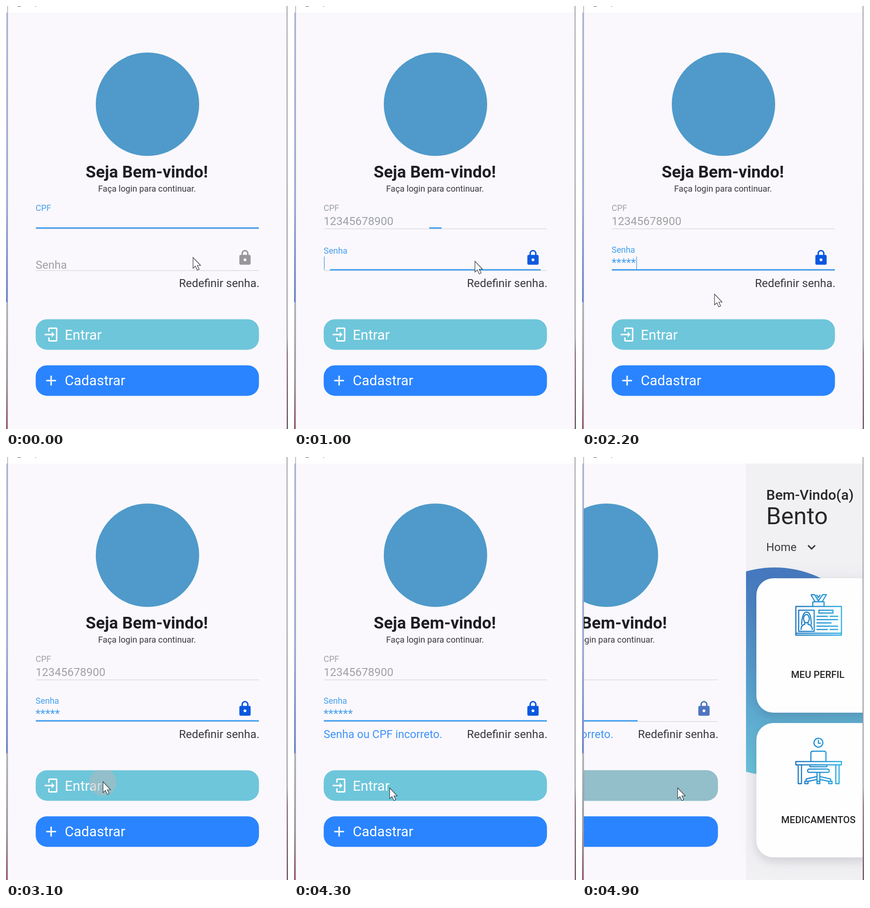
An HTML page for the animation above (5000 ms loop, 600 by 900 pixels).

```html
<!DOCTYPE html>
<html lang="pt-BR">
<head>
<meta charset="utf-8">
<title>Login</title>
<style>
  html, body { margin: 0; width: 100%; height: 100%; overflow: hidden; background: #faf8fc; }
  svg { display: block; width: 600px; height: 900px; font-family: Roboto, sans-serif; }
  .mid { text-anchor: middle; }
  .body { font-size: 24px; }
  .label { font-size: 18px; }
  .button { font-size: 29.6px; fill: #fff; }
  .dark { fill: #39393d; }
  .rule { fill: #d8d7da; }
  .white { fill: none; stroke: #fff; stroke-width: 3; }
  .card {
    fill: #fefefe;
    filter: drop-shadow(0 8px 10px rgba(40, 40, 60, .13)) drop-shadow(0 4px 24px rgba(40, 40, 60, .05));
  }
  .caption { font-size: 20.5px; font-weight: 500; fill: #28282b; text-anchor: middle; }
  .icon { fill: none; stroke: url(#ink); stroke-width: 2.4; stroke-linejoin: round; }
  .ripple { fill: #b6bab8; }
</style>
</head>
<body>
<svg viewBox="0 0 600 900">
  <defs>
    <linearGradient id="ink" gradientUnits="userSpaceOnUse" x1="454" y1="0" x2="553" y2="0">
      <stop offset="0" stop-color="#1d74c0"/><stop offset="1" stop-color="#2bb0e4"/>
    </linearGradient>
    <linearGradient id="sea" gradientUnits="userSpaceOnUse" x1="370" y1="250" x2="420" y2="690">
      <stop offset="0" stop-color="#4679bf"/><stop offset="1" stop-color="#6bc5da"/>
    </linearGradient>
    <linearGradient id="left" x1="0" y1="0" x2="0" y2="1">
      <stop offset="0" stop-color="#c3cdec"/><stop offset=".45" stop-color="#a9b9e8"/>
      <stop offset=".694" stop-color="#6f8be0"/><stop offset=".697" stop-color="#c4c6cc"/>
      <stop offset=".88" stop-color="#a9a6ac"/><stop offset="1" stop-color="#a4606c"/>
    </linearGradient>
    <linearGradient id="right" x1="0" y1="0" x2="0" y2="1">
      <stop offset="0" stop-color="#dcdce2"/><stop offset=".78" stop-color="#c9c8ce"/>
      <stop offset=".82" stop-color="#a08087"/><stop offset="1" stop-color="#6b4a52"/>
    </linearGradient>
    <clipPath id="pane"><rect x="4" y="14" width="593" height="886"/></clipPath>
    <clipPath id="page"><rect x="349" y="14" width="594" height="886"/></clipPath>
    <clipPath id="enter"><rect x="63.2" y="666.4" width="475" height="65" rx="24"/></clipPath>
  </defs>

  <rect width="600" height="900" fill="#faf8fc"/>
  <rect width="600" height="14" fill="#fff"/>
  <circle cx="28" cy="-7" r="8.5" fill="#77777b"/>
  <text x="61" y="-3" font-size="18" fill="#77777b">y</text>

  <g clip-path="url(#pane)">
    <g id="login">
      <circle cx="301" cy="209" r="110" fill="#4f9aca"/>
      <text class="mid" x="299.6" y="365" font-size="35.3" font-weight="700" fill="#1e1e22">Seja Bem-vindo!</text>
      <text class="mid" x="300" y="395" font-size="18.2" fill="#39393d">Faça login para continuar.</text>

      <rect class="rule" x="63.5" y="473.5" width="474.5" height="1.3"/>
      <rect id="cpfLine" y="470.8" height="3" fill="#439ff0"/>
      <text id="cpfLabel" class="label" x="63" y="436">CPF</text>
      <text id="cpfText" class="body" x="63" y="466"></text>
      <rect id="cpfCaret" y="444" width="1.3" height="26" fill="#439ff0"/>

      <rect class="rule" x="63.5" y="562.2" width="474.5" height="1.3"/>
      <rect id="passLine" y="559.8" height="3" fill="#439ff0"/>
      <text id="passLabel" x="63">Senha</text>
      <text id="passText" class="body" x="63" y="554"></text>
      <rect id="passCaret" y="533" width="1.3" height="28" fill="#439ff0"/>
      <path id="lock" transform="translate(490.5 517.5) scale(1.5)" d="M12 17a2 2 0 0 0 0-4 2 2 0 0 0 0 4m6-9a2 2 0 0 1 2 2v10a2 2 0 0 1-2 2H6a2 2 0 0 1-2-2V10a2 2 0 0 1 2-2h1V6a5 5 0 0 1 10 0v2h1m-6-5a3 3 0 0 0-3 3v2h6V6a3 3 0 0 0-3-3z"/>

      <text id="error" x="63" y="598" font-size="23.6" fill="#3f93fa">Senha ou CPF incorreto.</text>
      <text class="body dark" x="368" y="598">Redefinir senha.</text>

      <rect x="63.2" y="666.4" width="475" height="65" rx="24" fill="#6ec6db"/>
      <path transform="translate(80.8 681) scale(1.5)" fill="#fff" d="M11 16V13H1V11H11V8L15 12ZM8 2H17A2 2 0 0 1 19 4V20A2 2 0 0 1 17 22H8A2 2 0 0 1 6 20V16H8V20H17V4H8V8H6V4A2 2 0 0 1 8 2Z"/>
      <text class="button" x="125" y="709.5">Entrar</text>
      <g clip-path="url(#enter)"><circle id="ripple" class="ripple"/></g>

      <rect x="63.2" y="764.4" width="475" height="65" rx="24" fill="#2a84ff"/>
      <path class="white" d="M85.500 797H106.500M96 786.500V807.500"/>
      <text class="button" x="125" y="807">Cadastrar</text>
    </g>

    <g id="home">
      <g clip-path="url(#page)">
        <rect x="349" y="14" width="594" height="886" fill="#f1f0f3"/>
        <circle cx="410" cy="456.500" r="221.500" fill="url(#sea)"/>
      </g>
      <text x="392" y="91" font-size="30" font-weight="500" fill="#28282b">Bem-Vindo(a)</text>
      <text x="392" y="143" font-size="50.500" fill="#28282b">Bento</text>
      <text class="body dark" x="392" y="200">Home</text>
      <path d="M481 188L488.500 195.500L496 188" fill="none" stroke="#333337" stroke-width="3"/>
      <rect class="card" x="371" y="258" width="264" height="286" rx="36"/>
      <rect class="card" x="371" y="566" width="264" height="286" rx="36"/>

      <g class="icon">
        <path d="M455 318H552V379H455ZM455 375H552M461 326H494V371H461Z"/>
        <path d="M487 293H495L503 306L512 293H520L511 308M487 293L496 308M499 293L503 299L507 293M491 308H515V317M491 308V317"/>
        <path d="M466 368Q466 357 474 356V352M481 352V356Q490 357 490 368M467 357Q469 329 478 330Q487 329 488 357"/>
        <ellipse cx="477.500" cy="344" rx="6" ry="9"/>
        <path d="M504 326H534V332H504ZM499 339H523M527 339H545M499 346H545M499 353H531M499 360H545M499 367H523M527 367H545"/>
      </g>
      <text class="caption" x="501.500" y="470">MEU PERFIL</text>

      <g class="icon">
        <circle cx="503" cy="608" r="9.500"/>
        <path d="M503 602V609H508M487 647V630Q487 626 491 626H515Q519 626 519 630V647"/>
        <path d="M455 648H552V655H455ZM460 655V695H467V655M540 655V695H547V655"/>
        <path d="M485 655V659H521V655M484 664H522Q526 664 526 667.500Q526 671 522 671H484Q480 671 480 667.500Q480 664 484 664ZM500 671V695H506V671"/>
        <path d="M500 680L477 685V690M506 680L529 685V690M500 686L481 690M506 686L525 690"/>
        <path d="M474 690H481V695H474ZM525 690H532V695H525ZM499 690H507"/>
      </g>
      <text class="caption" x="503" y="779">MEDICAMENTOS</text>
    </g>
  </g>

  <rect y="14" width="3" height="886" fill="url(#left)"/>
  <rect x="3" width="1" height="900" fill="#85858d"/>
  <rect x="597" width="1.300" height="900" fill="#85858d"/>
  <rect x="598.300" width="1.700" height="900" fill="url(#right)"/>
  <path id="mouse" d="M0 0V23L5 18.500L9 27L13 25.200L9 17H16Z" fill="#fff" stroke="#3b3b40" stroke-width="1.200"/>
</svg>
<script>
const LOOP = 5000, STEP = 100;
const CPF = "12345678900";
const GREY = [160, 160, 163], BLUE = [67, 159, 240];
const LOCK_OFF = [151, 150, 154], LOCK_ON = [11, 87, 224];
// time, x, y of the pointer tip
const PATH = [
  [0, 398, 535], [600, 398, 535], [850, 385, 543], [1900, 385, 543],
  [2200, 282, 613], [2700, 206.5, 691], [3150, 206.5, 691], [3430, 202, 550],
  [3800, 202, 550], [4200, 203.5, 704], [5000, 203.5, 704]
];
const $ = id => document.getElementById(id);
const clamp = (v, a = 0, b = 1) => Math.min(b, Math.max(a, v));
const mix = (a, b, k) => a + (b - a) * k;
const tint = (a, b, k) => `rgb(${a.map((v, i) => Math.round(mix(v, b[i], k)))})`;
const set = (id, attrs) => { for (const k in attrs) $(id).setAttribute(k, attrs[k]); };
const show = (id, on) => set(id, { visibility: on ? "visible" : "hidden" });
// 200 ms ease-out from 0 to 1
const ramp = (t, start) => 1 - (1 - clamp((t - start) / 200)) ** 2;

function pointer(t) {
  const i = PATH.findIndex(p => p[0] > t);
  const [t0, x0, y0] = PATH[i - 1], [t1, x1, y1] = PATH[i];
  const k = (t - t0) / (t1 - t0);
  return [mix(x0, x1, k), mix(y0, y1, k)];
}

function line(id, k) {
  const w = 474.5 * k;
  set(id, { x: 300.75 - w / 2, width: w });
}

function draw(t) {
  const cpfOn = 1 - ramp(t, 847);
  const passOn = clamp(ramp(t, 847) - ramp(t, 3160) + ramp(t, 3428) - ramp(t, 4806));
  const typed = clamp(Math.ceil(t / 72), 0, CPF.length);
  const stars = clamp(Math.floor((t - 1050) / 150), 0, 5) + (t >= 3900 ? 1 : 0);

  line("cpfLine", cpfOn);
  line("passLine", passOn);
  $("cpfText").textContent = CPF.slice(0, typed);
  $("passText").textContent = "*".repeat(stars);
  const cpfInk = tint(GREY, BLUE, cpfOn), passInk = tint(GREY, BLUE, passOn);
  set("cpfLabel", { fill: cpfInk });
  set("cpfText", { fill: cpfInk });
  set("passText", { fill: passInk });

  const lift = ramp(t, 847);
  set("passLabel", { y: mix(559, 525, lift), "font-size": mix(24, 18, lift), fill: passInk });
  set("lock", { fill: tint(LOCK_OFF, LOCK_ON, Math.sqrt(passOn)) });

  const lastKey = t < 1800 ? t : t < 3428 ? 1800 : t < 3800 ? 3428 : 3800;
  const blink = (t - lastKey) % 1000 < 500;
  const focused = (t >= 900 && t < 3100) || (t > 3428 && t < 4700);
  set("cpfCaret", { x: 63.5 + typed * 13.48 });
  set("passCaret", { x: 63.8 + stars * 10.35 });
  show("cpfCaret", t > 0 && t < 847);
  show("passCaret", focused && blink);
  show("error", t >= 3200);

  const press = t < 4000 ? 3060 : 4660;
  const age = t - press;
  const [cx, cy] = t < 4000 ? [206, 692] : [203, 703];
  set("ripple", {
    cx, cy,
    r: age > 0 ? 29 * (age / 40) ** 1.4 : 0,
    opacity: 0.5 * clamp((540 - age) / 300)
  });

  const slide = t >= 4900 ? 249 : 0;
  set("login", { transform: `translate(${-slide} 0)` });
  set("home", { transform: `translate(${249 - slide} 0)` });
  show("home", slide > 0);
  set("mouse", { transform: `translate(${pointer(t)})` });
}

const begin = performance.now();
function tick() {
  const t = (performance.now() - begin) % LOOP;
  draw(Math.floor(t / STEP) * STEP);
  requestAnimationFrame(tick);
}
tick();
</script>
</body>
</html>
```
